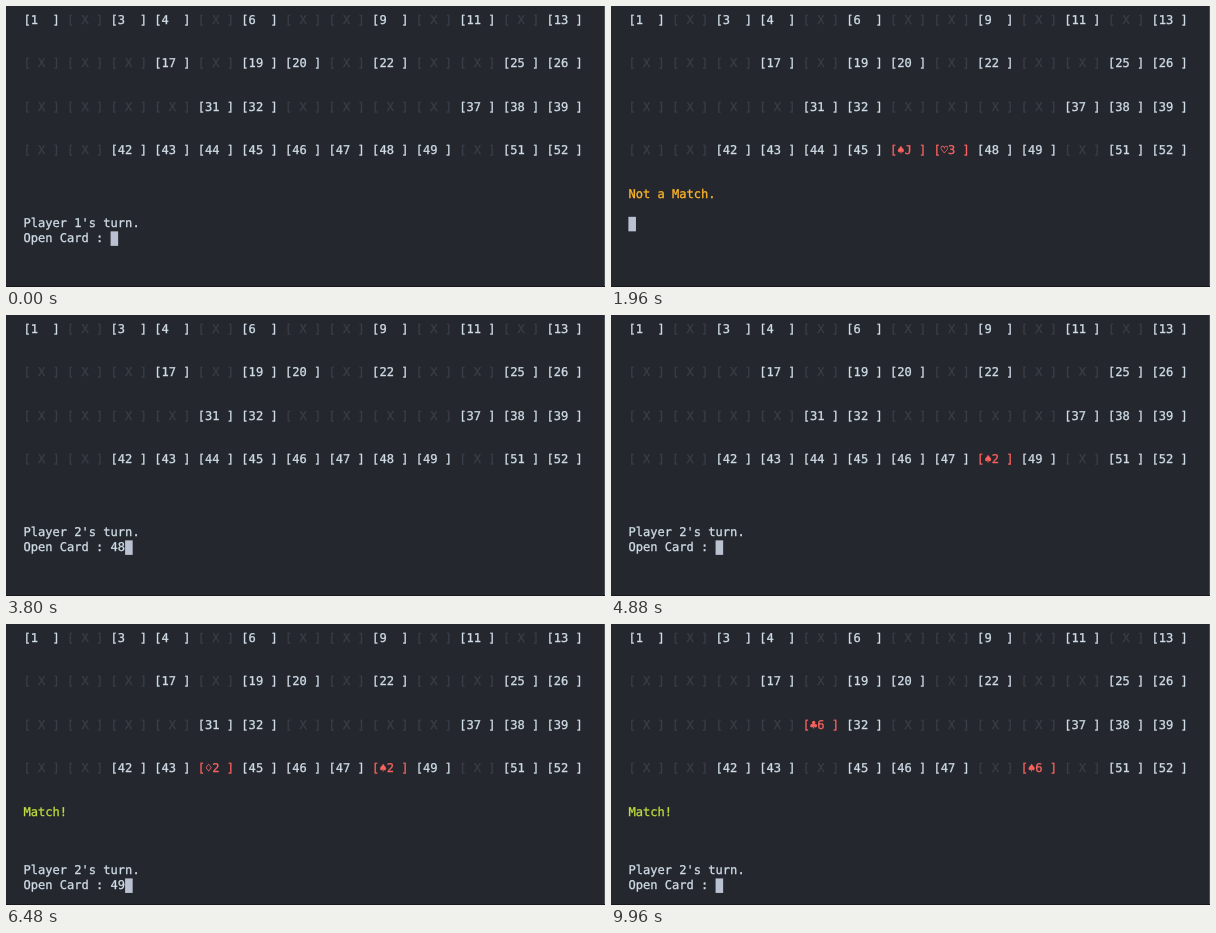
Animation of 599 by 281 pixels, one loop 10000 ms. Source, as an HTML page with a canvas:

```html
<!DOCTYPE html>
<html lang="en">
<head>
<meta charset="utf-8">
<title>Card matching game in a terminal</title>
<style>
  html, body { margin: 0; height: 100%; overflow: hidden; background: #24272e; }
  canvas { display: block; }
</style>
</head>
<body>
<canvas width="599" height="281"></canvas>
<script>
const ctx = document.querySelector('canvas').getContext('2d');
const LOOP = 10000;
const CHAR = 7.265, LINE = 14.53, LEFT = 17.4, TOP = 7.2;
const COLOR = {
  back: '#24272e', text: '#cfdce6', dim: '#3b3e45', cursor: '#bac2d2',
  open: '#f9625f', miss: '#fdb52a', match: '#bfdc3f'
};
const MISS = ['Not a Match.', COLOR.miss];
const MATCH = ['Match!', COLOR.match];
const hidden = new Set([1, 3, 4, 6, 9, 11, 13, 17, 19, 20, 22, 25, 26, 31, 32, 37, 38, 39,
  42, 43, 44, 45, 46, 47, 48, 49, 51, 52]);

// Each step changes part of the screen state from its time onwards.
const steps = [
  [0, { player: 1, row: 14, typed: '', open: {}, gone: [], note: null, clear: false, enter: false }],
  [40, { typed: '4' }],
  [120, { typed: '46' }],
  [240, { clear: true }],
  [280, { clear: false, typed: '', open: { 46: '♠J' } }],
  [880, { typed: '4' }],
  [960, { typed: '47' }],
  [1320, { typed: '', open: { 46: '♠J', 47: '♡3' }, note: MISS, player: 0 }],
  [3440, { clear: true }],
  [3480, { clear: false, open: {}, note: null, player: 2 }],
  [3720, { typed: '4' }],
  [3800, { typed: '48' }],
  [3960, { enter: true }],
  [4000, { enter: false, typed: '', open: { 48: '♠2' } }],
  [4920, { typed: '4' }],
  [5080, { typed: '44' }],
  [5160, { clear: true }],
  [5200, { clear: false, typed: '', open: { 44: '♢2', 48: '♠2' }, note: MATCH, row: 16 }],
  [6360, { typed: '4' }],
  [6480, { typed: '49' }],
  [6680, { typed: '', open: { 49: '♠6' }, gone: [44, 48], note: null, row: 14 }],
  [8880, { typed: '3' }],
  [8960, { typed: '31' }],
  [9080, { typed: '', open: { 31: '♣6', 49: '♠6' }, note: MATCH, row: 16 }]
];

// A hairline stroke gives the slightly heavy look of terminal text.
function print(text, col, row, color = COLOR.text) {
  ctx.fillStyle = ctx.strokeStyle = color;
  [...text].forEach((c, i) => {
    const x = LEFT + (col + i) * CHAR, y = TOP + 10.5 + row * LINE;
    ctx.fillText(c, x, y);
    ctx.strokeText(c, x, y);
  });
}

function cursor(col, row) {
  ctx.fillStyle = COLOR.cursor;
  ctx.fillRect(LEFT + col * CHAR, TOP + 0.2 + row * LINE, CHAR + 0.3, LINE);
}

function drawCards({ open, gone }) {
  for (let n = 1; n <= 52; n++) {
    const col = (n - 1) % 13 * 6, row = Math.floor((n - 1) / 13) * 3;
    if (open[n]) print(`[${open[n]} ]`, col, row, COLOR.open);
    else if (hidden.has(n) && !gone.includes(n)) print(`[${String(n).padEnd(3)}]`, col, row);
    else print('[ X ]', col, row, COLOR.dim);
  }
}

function drawScreen(s) {
  if (s.clear) return cursor(0, 0);
  drawCards(s);
  if (s.note) print(s.note[0], 0, 12, s.note[1]);
  if (!s.player) return cursor(0, s.row);
  const prompt = 'Open Card : ' + s.typed;
  print(`Player ${s.player}'s turn.`, 0, s.row);
  print(prompt, 0, s.row + 1);
  if (s.enter) cursor(0, s.row + 2);
  else cursor(prompt.length, s.row + 1);
}

function draw(now) {
  const time = now % LOOP;
  const past = steps.filter(([start]) => start <= time).map(([, change]) => change);
  ctx.fillStyle = COLOR.back;
  ctx.fillRect(0, 0, 599, 281);
  ctx.font = '12.07px "DejaVu Sans Mono", monospace';
  ctx.textRendering = 'geometricPrecision';
  ctx.lineWidth = 0.3;
  drawScreen(Object.assign({}, ...past));
  ctx.fillStyle = '#4b4e54';
  ctx.fillRect(598, 0, 1, 281);
  ctx.fillStyle = '#17191e';
  ctx.fillRect(0, 280, 599, 1);
  requestAnimationFrame(draw);
}
requestAnimationFrame(draw);
</script>
</body>
</html>
```
